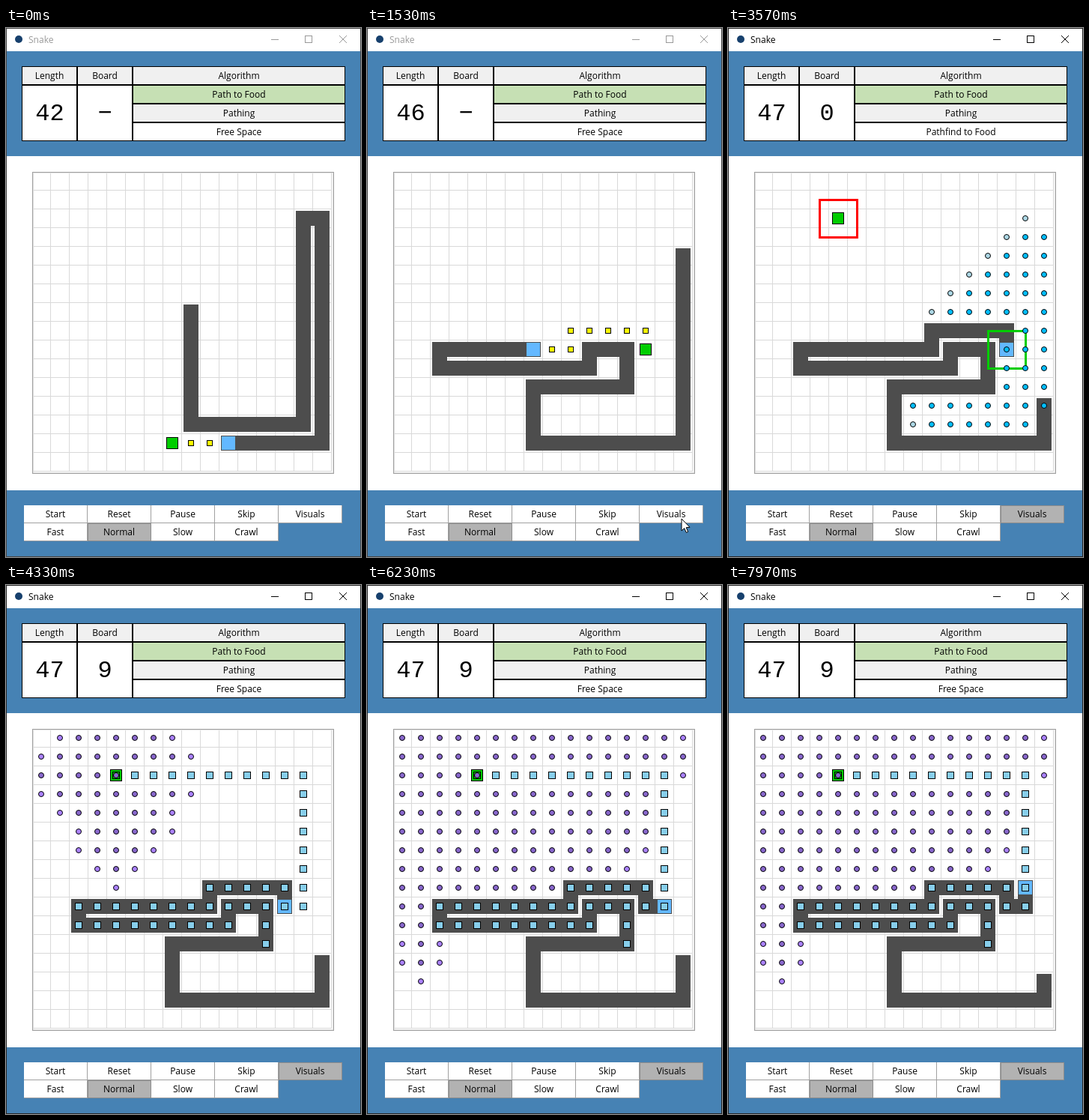
Animation of 474 by 706 pixels, one loop 8000 ms. Source, as an HTML page with a canvas:

```html
<!DOCTYPE html>
<html lang="en">
<head>
<meta charset="utf-8">
<title>Snake</title>
<style>
  html, body { margin: 0; width: 100%; height: 100%; overflow: hidden; background: #fff; }
  canvas { display: block; }
</style>
</head>
<body>
<canvas id="stage" width="474" height="706"></canvas>
<script>
const ctx = document.getElementById('stage').getContext('2d');
const LOOP = 8000, SIZE = 16, START_LENGTH = 42;
const BLUE = '#4682b4', BODY = '#4d4d4d';

// The whole route of the snake as corner cells [column, row], tail first.
const corners = [[8,7],[8,13],[14,13],[14,2],[15,2],[15,14],[7,14],[7,11],[12,11],[12,9],[10,9],
  [10,10],[2,10],[2,9],[9,9],[9,8],[13,8],[13,9],[14,9],[14,2],[4,2]];
const route = [corners[0]];
for (const [c, r] of corners.slice(1)) {
  let [x, y] = route.at(-1);
  while (x !== c || y !== r) {
    x += Math.sign(c - x);
    y += Math.sign(r - y);
    route.push([x, y]);
  }
}
const meals = [3, 13, 15, 24, 38, 56];   // moves on which food is eaten

// Slow, visualised part: [start time, move, kind]
const phases = [
  [1880, 36, 'search'], [2391.8, 36, 'fill'], [3300, 37, 'search'],
  [3465.4, 38, 'search'], [4255, 38, 'fill'], [4904, 39, 'search'],
  [5827.2, 39, 'fill'], [6735, 40, 'search'], [7560.6, 40, 'fill']
];

const px = c => 47 + 25 * c;
const py = r => 204 + 25 * r;
const key = ([c, r]) => r * SIZE + c;

function rect(x, y, w, h, fill) {
  ctx.fillStyle = fill;
  ctx.fillRect(x, y, w, h);
}

function frame(x, y, w, h, color, width = 1) {
  ctx.strokeStyle = color;
  ctx.lineWidth = width;
  ctx.strokeRect(x, y, w, h);
}

function line(points, color, width = 1) {
  ctx.strokeStyle = color;
  ctx.lineWidth = width;
  ctx.beginPath();
  points.forEach(([x, y]) => ctx.lineTo(x, y));
  ctx.stroke();
}

function text(s, x, y, { size = 12, color = '#000', align = 'center', font = '"Open Sans", sans-serif' } = {}) {
  ctx.font = `${size}px ${font}`;
  ctx.textAlign = align;
  ctx.fillStyle = color;
  ctx.fillText(s, x, y);
}

function square([c, r], size, fill, outline = '#000') {
  const x = px(c) - size / 2, y = py(r) - size / 2;
  rect(x, y, size, size, outline);
  rect(x + 1, y + 1, size - 2, size - 2, fill);
}

function dot([c, r], fill) {
  ctx.beginPath();
  ctx.arc(px(c), py(r), 3.5, 0, 2 * Math.PI);
  ctx.fillStyle = fill;
  ctx.fill();
  ctx.strokeStyle = '#000';
  ctx.lineWidth = 1;
  ctx.stroke();
}

// Breadth-first order of reachable cells, each with the index of its parent.
function explore(start, walls) {
  const seen = new Set([...walls, start].map(key));
  const order = [{ cell: start, parent: -1 }];
  for (let i = 0; i < order.length; i++) {
    const [c, r] = order[i].cell;
    for (const [dc, dr] of [[0, 1], [1, 0], [0, -1], [-1, 0]]) {
      const next = [c + dc, r + dr];
      if (next.some(v => v < 0 || v >= SIZE) || seen.has(key(next))) continue;
      seen.add(key(next));
      order.push({ cell: next, parent: i });
    }
  }
  return order;
}

function drawDots(order, elapsed, visited, waiting) {
  const steps = 3.53 * Math.max(0, elapsed) ** 0.7;
  const expanded = Math.ceil(Math.floor(steps) / 2), pushed = Math.floor(steps / 2);
  order.forEach(({ cell, parent }, i) => {
    if (parent < pushed) dot(cell, i < expanded ? visited : waiting);
  });
}

function drawTitleBar(active) {
  const ink = active ? '#000' : '#999';
  rect(0, 0, 474, 706, active ? '#262626' : '#454545');
  rect(1, 1, 472, 704, '#fff');
  ctx.beginPath();
  ctx.arc(17, 15, 5, 0, 2 * Math.PI);
  ctx.fillStyle = '#17406d';
  ctx.fill();
  text('Snake', 30, 20, { align: 'left', color: ink });
  line([[354, 15.5], [364, 15.5]], ink);
  frame(399.5, 10.5, 9, 9, ink);
  line([[445, 10], [455, 20]], ink);
  line([[455, 10], [445, 20]], ink);
}

function drawTable(length, board, task) {
  rect(1, 31, 472, 140, BLUE);
  rect(21, 51, 432, 100, '#000');
  const cell = (x, y, w, h, fill, label) => {
    rect(x, y, w, h, fill);
    text(label, x + w / 2, y + 16);
  };
  cell(22, 52, 72, 23, '#f0f0f0', 'Length');
  cell(96, 52, 72, 23, '#f0f0f0', 'Board');
  cell(170, 52, 282, 23, '#f0f0f0', 'Algorithm');
  cell(170, 77, 282, 23, '#c6e0b4', 'Path to Food');
  cell(170, 102, 282, 23, '#f0f0f0', 'Pathing');
  cell(170, 127, 282, 23, '#fff', task);
  rect(22, 77, 72, 73, '#fff');
  rect(96, 77, 72, 73, '#fff');
  const big = { size: 32, font: '"Liberation Mono", monospace' };
  text(length, 58.5, 123, big);
  text(board, 132, 123, big);
}

function drawButtons(visuals) {
  rect(1, 617, 472, 88, BLUE);
  const labels = ['Start', 'Reset', 'Pause', 'Skip', 'Visuals', 'Fast', 'Normal', 'Slow', 'Crawl'];
  labels.forEach((label, i) => {
    const x = 24 + 85 * (i % 5), y = i < 5 ? 637 : 661;
    const pressed = label === 'Normal' || (label === 'Visuals' && visuals);
    rect(x, y, 85, 24, '#a0a0a0');
    rect(x, y, 84, 23, '#fff');
    if (pressed) {
      rect(x + 1, y + 1, 83, 22, '#b2b2b2');
      frame(x + 0.5, y + 0.5, 84, 23, '#8c8c8c');
    }
    text(label, x + 42, y + 16);
  });
}

function drawGrid() {
  for (let i = 0; i < SIZE; i++) {
    rect(59 + 25 * i, 194, 1, 398, '#d9d9d9');
    rect(37, 216 + 25 * i, 398, 1, '#d9d9d9');
  }
  frame(36.5, 193.5, 400, 400, '#e3e3e3');
  frame(35.5, 192.5, 402, 402, '#a0a0a0');
}

function drawCursor(t) {
  if (t < 1000 || t > 2500) return;
  const ease = u => { u = Math.min(1, Math.max(0, u)); return u * u * (3 - 2 * u); };
  const away = 1 - ease((t - 1000) / 450) + ease((t - 2000) / 450);
  ctx.save();
  ctx.translate(420 + 60 * away, 655 - 20 * away);
  ctx.beginPath();
  [[0, 0], [0, 16], [3.7, 12.6], [6.3, 18.4], [8.7, 17.3], [6.2, 11.7], [11, 11.3]]
    .forEach(([x, y]) => ctx.lineTo(x, y));
  ctx.closePath();
  ctx.fillStyle = '#fff';
  ctx.fill();
  ctx.strokeStyle = '#000';
  ctx.lineWidth = 1;
  ctx.stroke();
  ctx.restore();
}

function draw(time) {
  const t = time % LOOP;
  const tick = Math.floor((t + 5) * 0.03) / 0.03;   // visualised part runs at 30 steps a second
  const phase = phases.findLast(p => p[0] <= tick);
  const [start, , kind] = phase || [0, 0, 'play'];
  const move = phase ? phase[1]
    : t < 1600 ? Math.min(30, Math.max(0, Math.floor((t - 20) / 50)))
    : Math.min(36, 31 + Math.floor((t - 1600) / 55));

  const head = START_LENGTH - 1 + move;
  const size = START_LENGTH + meals.filter(m => m < move).length;
  const length = START_LENGTH + meals.filter(m => m <= move).length;
  const goal = START_LENGTH - 1 + meals.find(m => m > move);
  const body = route.slice(head - size + 1, head + 1);
  const board = kind === 'play' ? '−' : kind === 'fill' || move === 37 ? '9' : '0';

  drawTitleBar(t >= 1750);
  drawTable(length, board, kind === 'search' ? 'Pathfind to Food' : 'Free Space');
  drawButtons(t >= 1750);
  drawGrid();

  square(route[goal], 16, '#00cd00');
  ctx.lineCap = 'square';
  line(body.map(([c, r]) => [px(c), py(r)]), BODY, 20);
  ctx.lineCap = 'butt';
  square(route[head], 20, '#63b8ff', BODY);

  if (kind !== 'fill' && move !== 38) {
    route.slice(head + 1, goal).forEach(cell => square(cell, 8, '#ffff00'));
  }
  if (kind === 'search') {
    const box = ([c, r], color) => frame(px(c) - 24.5, py(r) - 24.5, 50, 50, color, 3);
    box(route[goal], '#ff0000');
    box(route[head], '#00cd00');
    if (move !== 38) route.slice(head + 1, goal).forEach(cell => square(cell, 8, '#ffff00'));
    drawDots(explore(route[head], body.slice(1)), tick - start, '#00bfff', '#add8e6');
  }
  if (kind === 'fill') {
    const future = route.slice(goal - length + 2, goal);
    future.forEach(cell => square(cell, 10, '#87ceeb'));
    square(route[goal], 10, '#00cd00');
    drawDots(explore(route[goal], future), tick - start, '#8968cd', '#ab82ff');
  }
  drawCursor(t);
}

const origin = performance.now();
function loop() {
  draw(performance.now() - origin);
  requestAnimationFrame(loop);
}
loop();
</script>
</body>
</html>
```
